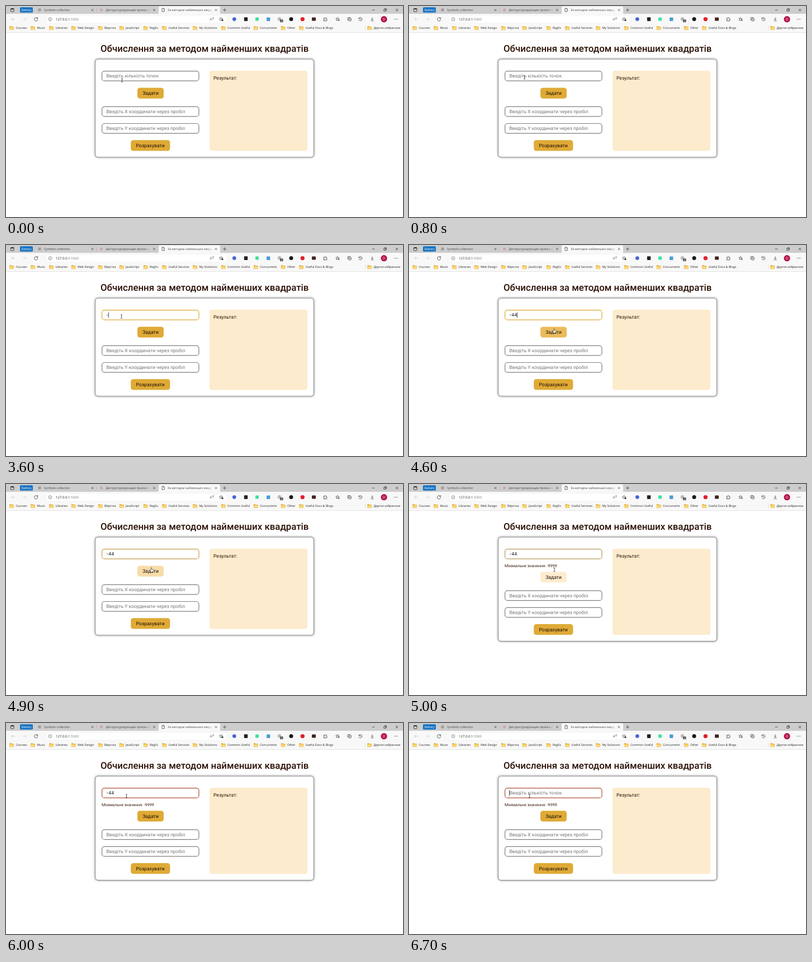
Write an HTML page with a canvas that moves like this. It is 710x378 px and loops after 8 s.

```html
<!DOCTYPE html>
<html lang="uk">
<head>
<meta charset="utf-8">
<title>Обчислення за методом найменших квадратів</title>
<style>
html, body { margin: 0; width: 100%; height: 100%; overflow: hidden; background: #fff; }
canvas { display: block; width: 710px; height: 378px; }
</style>
</head>
<body>
<canvas id="stage"></canvas>
<script>
const W = 710, H = 378, LOOP = 8000, STEP = 100;
const canvas = document.getElementById('stage');
const dpr = window.devicePixelRatio || 1;
canvas.width = W * dpr;
canvas.height = H * dpr;
const ctx = canvas.getContext('2d');

const UI = '"Open Sans", "Noto Sans", sans-serif';
const PAGE = 'Roboto, "Noto Sans", sans-serif';
const DIGITS = 'Inter, "Noto Sans", sans-serif';
const GOLD = [223, 170, 54], HOVER = [235, 187, 92], PRESSED = [253, 236, 207];
const GREY = [128, 128, 128], TAN = [184, 152, 92], RED = [176, 80, 56];

// Keys are [time, value, value, ...]; values in between are linear.
function track(keys, t) {
  const i = keys.findIndex(k => k[0] > t);
  if (i < 0) return keys[keys.length - 1].slice(1);
  if (i === 0) return keys[0].slice(1);
  const a = keys[i - 1], b = keys[i], p = (t - a[0]) / (b[0] - a[0]);
  return a.slice(1).map((v, n) => v + (b[n + 1] - v) * p);
}
function at(list, t) {
  return list.filter(e => e[0] <= t).pop()[1];
}
const rgb = c => `rgb(${c.map(Math.round).join(',')})`;

const FAIL = 5000;
const POINTER = [
  [0, 207.5, 133], [800, 206.5, 128], [4200, 206.5, 128],
  [4400, 238, 146], [4600, 259.5, 153.5], [5000, 260, 153.5],
  [5100, 256, 152], [5300, 206, 142.5], [5500, 209, 133], [5800, 215.5, 131]
];
const SHAPE = [
  [0, 'beam'], [4400, 'hand'], [FAIL, 'beam'], [5200, 'arrow'], [5400, 'beam']
];
const TYPED = [
  [0, ''], [3600, '-'], [3800, '-4'], [3900, '-44'],
  [6500, '-4'], [6600, '-'], [6700, '']
];
const CARET = [[0, false], [2200, true], [4800, false], [6200, true]];
const BORDER = [
  [2100, ...GREY], [2600, ...GOLD], [4700, ...GOLD],
  [5000, ...TAN], [5300, 183, 104, 72], [5700, ...RED]
];
const BUTTON = [
  [4300, ...GOLD], [4600, ...HOVER], [4700, ...HOVER],
  [FAIL, ...PRESSED], [5300, 228, 181, 78], [5600, ...GOLD]
];

function text(str, x, y, size, color, family = UI, weight = 400) {
  ctx.font = `${weight} ${size}px ${family}`;
  ctx.fillStyle = color;
  ctx.fillText(str, x, y);
}
function box(x, y, w, h, r, fill, stroke, lw = 1) {
  ctx.beginPath();
  ctx.roundRect(x, y, w, h, r);
  if (fill) { ctx.fillStyle = fill; ctx.fill(); }
  if (stroke) { ctx.strokeStyle = stroke; ctx.lineWidth = lw; ctx.stroke(); }
}
function disc(x, y, r, fill, stroke, lw = 0.8) {
  ctx.beginPath();
  ctx.arc(x, y, r, 0, Math.PI * 2);
  if (fill) { ctx.fillStyle = fill; ctx.fill(); }
  if (stroke) { ctx.strokeStyle = stroke; ctx.lineWidth = lw; ctx.stroke(); }
}
function path(d, x, y, color, lw = 0.8, fill) {
  ctx.save();
  ctx.translate(x, y);
  const p = new Path2D(d);
  if (fill) { ctx.fillStyle = fill; ctx.fill(p); }
  if (color) { ctx.strokeStyle = color; ctx.lineWidth = lw; ctx.stroke(p); }
  ctx.restore();
}
// Text that fades out before a tab's close button.
function tabTitle(str, x, end) {
  const g = ctx.createLinearGradient(end - 12, 0, end, 0);
  g.addColorStop(0, '#444');
  g.addColorStop(1, 'rgba(68,68,68,0)');
  text(str, x, 9.2, 5.4, g);
}

function drawTabs() {
  box(0, 0, W, 14, 0, '#cdcdcd');
  box(8.5, 4.5, 5.6, 5.6, 1, null, '#222', 0.8);
  box(8.5, 4.5, 5.6, 1.6, 0.5, '#222');
  box(25, 2.3, 23, 9.5, 1.5, '#1673c4');
  text('Battery', 27.8, 9, 5.3, '#fff');
  box(57.5, 4.5, 5, 5, 0.5, '#a39a9a');
  tabTitle('Symbols collection', 68, 140);
  disc(170.5, 7, 2.6, '#cfa5a8');
  tabTitle('Деструктурирующее присваивание', 178.5, 258);
  ctx.fillStyle = '#a8a8a8';
  ctx.fillRect(161.8, 4, 0.6, 7);
  box(273, 0.5, 110, 14, [3, 3, 0, 0], '#f8f8f8');
  path('M-2 -3H0.8L2.2 -1.5V3H-2ZM0.8 -3V-1.4H2.2', 281, 7, '#333', 0.7);
  tabTitle('За методом найменших квадратів', 289, 370);
  for (const x of [154.5, 265, 375.5])
    path('M-1.8 -1.8L1.8 1.8M1.8 -1.8L-1.8 1.8', x, 7.2, '#333', 0.7);
  path('M-3 0H3M0 -3V3', 391, 7.2, '#333', 0.7);
  path('M-2.2 0H2.2', 657, 7.2, '#222', 0.7);
  path('M-2.2 -1.2H1.2V2.2H-2.2ZM-1 -1.2V-2.3H2.3V1H1.2', 678, 7.2, '#222', 0.7);
  path('M-2.2 -2.2L2.2 2.2M2.2 -2.2L-2.2 2.2', 699, 7.2, '#222', 0.7);
}

const STAR = 'M0 -3L0.9 -1L3 -0.8L1.4 0.6L1.9 2.8L0 1.6L-1.9 2.8L-1.4 0.6L-3 -0.8L-0.9 -1Z';
function drawToolbar() {
  box(0, 14, W, 33.5, 0, '#f8f8f8');
  path('M3 0H-3M-0.3 -2.7L-3 0L-0.3 2.7', 13, 23.7, '#c4c4c4');
  path('M-3 0H3M0.3 -2.7L3 0L0.3 2.7', 33, 23.7, '#d0d0d0');
  path('M2.6 -1.6A3.1 3.1 0 1 0 3.1 0.3M2.9 -3.3V-1.3H0.9', 53.7, 23.7, '#333');
  box(72, 17, 323, 13.4, 3, '#fff', '#ececec', 0.5);
  disc(79, 23.7, 2.9, null, '#666', 0.7);
  path('M0 -0.4V1.6M0 -1.6V-1', 79, 23.7, '#666', 0.7);
  text('127.0.0.1', 89, 25.8, 6.05, '#222');
  const hostW = ctx.measureText('127.0.0.1').width;
  text(':5500', 89 + hostW, 25.8, 6.05, '#777');
  text('A', 364.4, 26, 6.2, '#555');
  path('M0 -2A2 2 0 0 1 0 1M1.5 -3A3.4 3.4 0 0 1 1.5 1.5', 369, 22.6, '#555', 0.6);
  path(STAR, 384.6, 23.4, '#444', 0.7);
  disc(387, 25.5, 1.7, '#444');

  disc(408.3, 23.6, 3.3, '#4660d8');
  box(425.8, 20.3, 6.4, 6.6, 1, '#222');
  box(446, 20.5, 6, 6, 1, '#3fe0a0');
  box(466, 20.5, 6.4, 6.4, 1, '#4d9bd8');
  disc(489, 23.3, 3.2, '#b9b9b9');
  box(490, 24.3, 5.6, 5, 1, '#555');
  text('4', 491.4, 28.5, 4.5, '#fff');
  disc(510, 23.6, 3.5, '#191919');
  disc(530.3, 23.6, 3.7, '#e0202c');
  box(547, 20.6, 7, 6, 0.8, '#40261c');

  path('M-2.8 -1.8H-1A1 1 0 1 1 1 -1.8H2.3V0A1 1 0 1 1 2.3 2V3H-2.8V1.6A1 1 0 1 0 -2.8 -0.4Z', 571, 23.7, '#333');
  path(STAR, 592.8, 23.4, '#333', 0.7);
  path('M1.5 1.3H4M2 2.7H4', 592.8, 23.4, '#333', 0.7);
  box(611, 20.5, 4.8, 4.8, 1, null, '#333', 0.7);
  box(612.6, 22, 4.8, 4.8, 1, '#f8f8f8', '#333', 0.7);
  path('M-1.2 0H1.2M0 -1.2V1.2', 615, 24.4, '#333', 0.6);
  path('M-2.8 -1.2A3 3 0 1 1 -2.9 0.9M-3 -3V-1H-1M0 -1.6V0.3H1.5', 634, 23.7, '#333', 0.7);
  path('M0 -3.2V1.2M-1.9 -0.6L0 1.3L1.9 -0.6M-2.6 3H2.6', 655, 23.7, '#333', 0.7);
  disc(676, 23.7, 5.6, '#b5124c');
  text('D', 673.7, 26, 6.3, '#fff');
  for (const dx of [-2.4, 0, 2.4]) disc(697 + dx, 23.6, 0.6, '#222');
}

const BOOKMARKS = [
  [17.5, 'Courses'], [55.5, 'Music'], [88.5, 'Libraries'], [128, 'Web Design'],
  [176, 'Вёрстка'], [214, 'JavaScript'], [257, 'RegEx'], [290.5, 'Useful Services'],
  [345.5, 'My Solutions'], [396, 'Common Useful'], [454, 'Concurrents'],
  [503, 'Other'], [535.5, 'Useful Docs & Blogs'], [657.5, 'Другое избранное']
];
function drawBookmarks() {
  for (const [x, name] of BOOKMARKS) {
    path('M0 0H2.8L3.8 1.1H7V6H0Z', x - 10.8, 36.5, '#c98f1c', 0.5, '#f2c14a');
    path('M0 2.3H7V6H0Z', x - 10.8, 36.5, null, 0, '#ffd977');
    text(name, x, 41.4, 5.35, '#222');
  }
  ctx.fillStyle = '#d0d0d0';
  ctx.fillRect(642, 35.5, 0.6, 8);
  ctx.fillStyle = '#e4e4e4';
  ctx.fillRect(0, 47, W, 1);
}

function field(y, border, hint) {
  box(171.6, y + 0.6, 173.4, 17.6, 4.5, '#fff', rgb(border), 1.2);
  if (hint) text(hint, 179.5, y + 12.3, 8.53, '#757575', PAGE);
}
function button(x, y, w, label, color) {
  box(x, y, w, 19.2, 4.5, rgb(color));
  text(label, x + 9.2, y + 12.7, 8.65, '#1c0d04', PAGE);
}

function drawPage(t) {
  const failed = t >= FAIL;
  const dy = failed ? 10.8 : 0;
  const typed = at(TYPED, t);
  const ink = '#2b1006';

  text('Обчислення за методом найменших квадратів', 169, 82, 16.82, ink, PAGE, 500);

  ctx.save();
  ctx.shadowColor = 'rgba(0,0,0,0.5)';
  ctx.shadowBlur = 4 * dpr;
  box(159.4, 95, 391.2, 176 + dy, 5, '#fff');
  ctx.restore();
  box(159.6, 95.2, 390.8, 175.6 + dy, 5, '#fff', '#929292', 1.1);

  box(364, 116, 175, 143.5 + dy, 4, '#fcebcc');
  text('Результат:', 371, 132, 8.6, ink, PAGE);

  field(116, track(BORDER, t), typed ? '' : 'Введіть кількість точок');
  text(typed, 179.5, 128.3, 8, '#111', DIGITS);
  if (at(CARET, t))
    ctx.fillRect(179.3 + ctx.measureText(typed).width, 120.5, 0.7, 10);
  if (failed) text('Мінімальне значення: -9999', 171, 148.8, 7.15, '#3a1a0c', PAGE);

  button(235, 146.5 + dy, 47, 'Задати', track(BUTTON, t));
  field(179.7 + dy, GREY, 'Введіть X координати через пробіл');
  field(209.9 + dy, GREY, 'Введіть Y координати через пробіл');
  button(223.2, 240.3 + dy, 70.2, 'Розрахувати', GOLD);
}

function drawPointer(t) {
  const [x, y] = track(POINTER, t);
  const shape = at(SHAPE, t);
  if (shape === 'beam')
    path('M-1.5 -3H1.5M0 -3V3M-1.5 3H1.5', x, y, '#222', 0.7);
  else if (shape === 'arrow')
    path('M0 -3.5V3L1.4 1.8L2.4 4L3.3 3.6L2.4 1.5H4.2Z', x, y, '#333', 0.6, '#fff');
  else
    path('M-0.7 -3.6Q0 -4.4 0.6 -3.6V-1L3.2 -0.2Q3.7 0 3.5 1.2L2.7 4H-0.8L-2.6 1.2Q-2.4 0.2 -0.7 1.2Z',
      x, y, '#333', 0.6, '#fff');
}

function frame(now) {
  const t = Math.floor((now % LOOP) / STEP) * STEP;
  ctx.setTransform(dpr, 0, 0, dpr, 0, 0);
  ctx.textRendering = 'geometricPrecision';
  ctx.fillStyle = '#fff';
  ctx.fillRect(0, 0, W, H);
  drawTabs();
  drawToolbar();
  drawBookmarks();
  drawPage(t);
  drawPointer(t);
}

let start;
function tick(now) {
  if (start === undefined) start = now;
  frame(now - start);
  requestAnimationFrame(tick);
}
frame(0);
requestAnimationFrame(tick);
</script>
</body>
</html>
```
